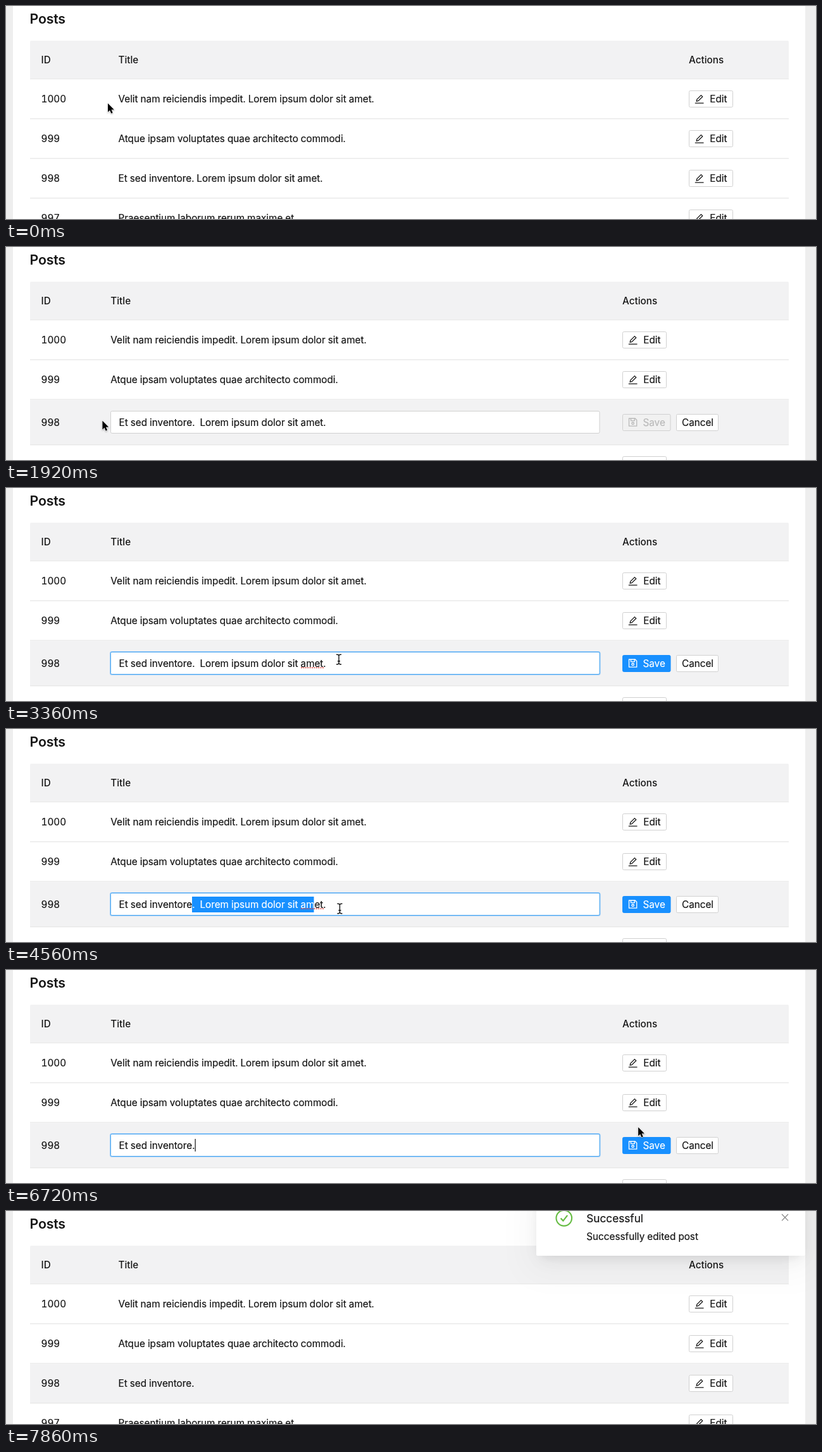
These frames come from a looping animation (1280x338 px, 7920 ms). An HTML page:

```html
<!DOCTYPE html>
<html lang="en">
<head>
<meta charset="utf-8">
<title>Posts</title>
<style>
  html, body { margin: 0; width: 100%; height: 100%; overflow: hidden; }
  body { position: relative; background: #eee; color: #161616; }
  svg { display: block; position: absolute; left: 0; top: 0; }
  text {
    font: 400 15.25px Inter, "Open Sans", sans-serif;
    font-variant-numeric: tabular-nums;
    fill: currentColor;
    stroke: currentColor;
    stroke-width: .2;
    white-space: pre;
  }
  .head text { font-weight: 500; stroke: none; }
  .head .title { font-size: 21.3px; font-weight: 600; letter-spacing: -.2px; }
  .line { stroke: #e6e6e6; stroke-width: 1.1; }
  .btn { fill: #fff; stroke: #d0d0d0; }
  .icon { fill: none; stroke: currentColor; stroke-width: 1.3; }
  #field { fill: #fff; stroke: #d0d0d0; }
  #field.hot { stroke: #5aaef0; }
  #glow { fill: none; stroke: #1890ff; stroke-width: 3; }
  #save { color: #fff; }
  #save rect { fill: #1890ff; stroke: #1890ff; }
  #save.off { color: #b9b9b9; }
  #save.off rect { fill: #f1f1f1; stroke: #d0d0d0; }
  #note {
    position: absolute; left: 838px; top: -28px; width: 425px; height: 99px;
    background: #fff; border-radius: 2px;
    box-shadow: 0 7px 18px -9px rgba(0,0,0,.12), 0 10px 31px rgba(0,0,0,.05),
      0 13px 53px 18px rgba(0,0,0,.03);
  }
  #note .big { font-size: 17.2px; }
</style>
</head>
<body>
<svg id="stage" width="1280" height="338" viewBox="0 0 1280 338">
  <defs>
    <path id="pen" d="M.3 13.6H14M2.7 10.6 3.3 7.7 9.9 1.1 12.2 3.4 5.6 10Z"/>
    <path id="disk" d="M1 1H10.6L13.2 3.6V13.2H1ZM4 1V4.6H9.8V1M7.1 7a1.7 1.7 0 1 0 .01 0Z"/>
    <clipPath id="selClip"><rect id="clipBox" y="24" height="25"/></clipPath>
  </defs>
  <rect x="11" width="1252" height="338" fill="#fff"/>
  <g class="head">
    <text class="title" x="37.5" y="27.8">Posts</text>
    <rect x="38" y="55" width="1199" height="61" rx="2" fill="#f2f2f3"/>
    <path class="line" d="M38 115.8H1237"/>
    <text x="55.5" y="91">ID</text>
    <text class="colTitle" y="91">Title</text>
    <text class="colAct" y="91">Actions</text>
  </g>
  <g id="rows"></g>
  <g id="editor">
    <rect id="glow" x="165.5" y="18.5" width="772.5" height="35" rx="2"/>
    <rect id="field" x="165.5" y="18.5" width="772.5" height="35" rx="2"/>
    <text id="value" x="178.5" y="41.5"></text>
    <g id="sel">
      <rect id="selBox" y="24" height="25" fill="#1890ff"/>
      <text id="selText" x="178.5" y="41.5" color="#fff" clip-path="url(#selClip)"></text>
    </g>
    <path id="typo" d="M466 43.3H502" stroke="#e2473f" stroke-width="1.6" stroke-dasharray="2 1.4"/>
    <rect id="caret" y="26" width="1.2" height="20" fill="#111"/>
    <g id="save">
      <rect x="974.5" y="23.5" width="75.5" height="26" rx="2"/>
      <use class="icon" href="#disk" x="983.5" y="29"/>
      <text x="1006.5" y="41.5">Save</text>
    </g>
    <rect class="btn" x="1059.5" y="23.5" width="66" height="26" rx="2"/>
    <text x="1068" y="41.5">Cancel</text>
  </g>
  <g id="pointer">
    <path id="arrow" d="M0 0V13.8L3.1 10.9 5.3 16 7.6 15 5.5 10H9.8Z"
      fill="#000" stroke="#fff" stroke-width="1.2" paint-order="stroke"
      style="filter:drop-shadow(0 1px 1px rgba(0,0,0,.3))"/>
    <path id="beam" d="M-4-7.8Q0-8 0-5.5V5.5Q0 8-4 7.8M4-7.8Q0-8 0-5.5M0 5.5Q0 8 4 7.8M-2 2.8H2"
      fill="none" stroke="#111" stroke-width="1.4"/>
  </g>
</svg>
<div id="note">
  <svg width="425" height="99" viewBox="838 -28 425 99">
    <circle cx="881.8" cy="11.3" r="12.3" fill="none" stroke="#67bd45" stroke-width="2.1"/>
    <path d="M876.6 11.4 880.4 15.6 887.2 6.8" fill="none" stroke="#67bd45" stroke-width="2.2"/>
    <text class="big" x="917.3" y="17.6">Successful</text>
    <text x="917.3" y="46.4">Successfully edited post</text>
    <path d="M1226 5 1236 15.4M1236 5 1226 15.4" stroke="#8a8a8a" stroke-width="1.3"/>
  </svg>
</div>
<script>
const LOOP = 7920;
const OPEN_A = 1000, READY_A = 1400, OPEN_B = 1740, READY_B = 2160;
const FOCUS = 2850, DRAG = 4260, CLEAR = 5640, DOT = 5700, SAVED = 7260;
const SHORT = "Et sed inventore.", TAIL = "Lorem ipsum dolor sit amet.";
const posts = [
  [1000, "Velit nam reiciendis impedit. " + TAIL],
  [999, "Atque ipsam voluptates quae architecto commodi."],
  [998, SHORT + " " + TAIL],
  [997, "Praesentium laborum rerum maxime et."]
];
// time, x, y
const path = [
  [360, 161, 154.5], [900, 152, 212], [1260, 152, 212], [1680, 152, 275],
  [2060, 153, 276], [2400, 422, 275], [2780, 524, 273], [3360, 526, 272],
  [3600, 526, 273], [4080, 292, 280], [DRAG, 292, 281], [4560, 527, 285],
  [4860, 619, 280], [6120, 619, 280], [6720, 999, 249.5], [6900, 1010, 267],
  [7240, 1010, 267], [7740, 905, 285], [7800, 730, 292]
];

const $ = id => document.getElementById(id);
const clamp = (v, a = 0, b = 1) => Math.min(b, Math.max(a, v));
const show = (el, on) => { el.style.display = on ? "" : "none"; };
const move = (el, x, y) => el.setAttribute("transform", `translate(${x} ${y})`);
const between = (t, a, b) => t >= a && t < b;

$("rows").innerHTML = posts.map(([id, title]) => `
  <g>
    <rect class="bg" x="38" width="1199" fill="#f2f2f3"/>
    <path class="line" d="M38 0H1237"/>
    <text class="id" x="55.5">${id}</text>
    <g class="view">
      <text class="colTitle" y="37">${title}</text>
      <g class="act">
        <rect class="btn" x=".5" y="18.5" width="69" height="26" rx="2"/>
        <use class="icon" href="#pen" x="9.5" y="24.5"/>
        <text x="33.3" y="37">Edit</text>
      </g>
    </g>
  </g>`).join("");

const rows = [...$("rows").children].map(g => ({
  g,
  bg: g.querySelector(".bg"),
  line: g.querySelector(".line"),
  id: g.querySelector(".id"),
  view: g.querySelector(".view"),
  title: g.querySelector(".colTitle"),
  act: g.querySelector(".act")
}));
const titleCells = document.querySelectorAll(".colTitle");
const actHead = document.querySelector(".colAct");

// Monotone cubic through the pointer path
function slope(i, k) {
  if (i < 1 || i > path.length - 2) return 0;
  const rate = j => (path[j + 1][k] - path[j][k]) / (path[j + 1][0] - path[j][0]);
  const a = rate(i - 1), b = rate(i);
  return a * b <= 0 ? 0 : 2 * a * b / (a + b);
}
function pointerAt(t, k) {
  t = clamp(t, path[0][0], path[path.length - 1][0]);
  let i = 0;
  while (i < path.length - 2 && t > path[i + 1][0]) i++;
  const [p, q] = [path[i], path[i + 1]];
  const h = q[0] - p[0], s = (t - p[0]) / h, r = 1 - s;
  return p[k] * (1 + 2 * s) * r * r + q[k] * s * s * (3 - 2 * s)
    + h * s * r * (slope(i, k) * r - slope(i + 1, k) * s);
}

function drawTable(t, active) {
  const editing = active >= 0;
  const enter = clamp((t - 620) / 250), leave = clamp((t - 1580) / 250);
  const hover = [0, enter - leave, leave, 0];
  let top = 116;
  rows.forEach((row, i) => {
    const open = i === active, h = open ? 72 : 63;
    move(row.g, 0, top);
    row.bg.setAttribute("height", h);
    row.bg.setAttribute("opacity", hover[i]);
    move(row.line, 0, h - .1);
    row.id.setAttribute("y", open ? 41.5 : 37);
    show(row.view, !open);
    move(row.act, editing ? 974 : 1079, 0);
    if (open) move($("editor"), 0, top);
    top += h;
  });
  rows[2].title.textContent = t < SAVED ? posts[2][1] : SHORT;
  titleCells.forEach(el => el.setAttribute("x", editing ? 165.3 : 177.5));
  actHead.setAttribute("x", editing ? 974 : 1079);
}

function drawEditor(t, active, inField) {
  show($("editor"), active >= 0);
  if (active < 0) return;
  const value = active === 1 ? posts[1][1]
    : t < CLEAR ? SHORT + "  " + TAIL
    : t < DOT ? SHORT.slice(0, -1) : SHORT;
  $("value").textContent = $("selText").textContent = value;

  const focused = t >= FOCUS;
  $("field").classList.toggle("hot", focused || inField);
  $("glow").setAttribute("opacity", .45 * clamp((t - FOCUS) / 300));
  $("save").classList.toggle("off", t < READY_A || between(t, OPEN_B, READY_B));
  show($("typo"), between(t, FOCUS, CLEAR));

  const from = 294, width = clamp(pointerAt(t - 60, 1), from, 506) - from;
  show($("sel"), between(t, DRAG, CLEAR));
  for (const box of [$("selBox"), $("clipBox")]) {
    box.setAttribute("x", from);
    box.setAttribute("width", width);
  }

  const since = t < CLEAR ? FOCUS : t < DOT ? CLEAR : DOT;
  const blink = (t - since) % 1000 < 500;
  show($("caret"), focused && blink && !between(t, 3800, CLEAR));
  $("caret").setAttribute("x", t < CLEAR ? 506 : t < DOT ? 294 : 298.5);
}

function draw(t) {
  const active = t < OPEN_A || t >= SAVED ? -1 : t < OPEN_B ? 1 : 2;
  const x = pointerAt(t, 1), y = pointerAt(t, 2);
  const top = active === 1 ? 197 : 260;
  const inField = active >= 0 && between(x, 165, 938) && between(y, top, top + 36);

  drawTable(t, active);
  drawEditor(t, active, inField);

  move($("pointer"), x, y);
  show($("pointer"), !between(t, CLEAR, 6120) && t < 7860);
  show($("arrow"), !inField);
  show($("beam"), inField);

  const p = 1 - (1 - clamp((t - SAVED) / 240)) ** 3;
  $("note").style.opacity = p;
  $("note").style.transform = `translateX(${425 * (1 - p)}px)`;
}

const start = performance.now();
function tick() {
  draw((performance.now() - start) % LOOP);
  requestAnimationFrame(tick);
}
tick();
</script>
</body>
</html>
```
